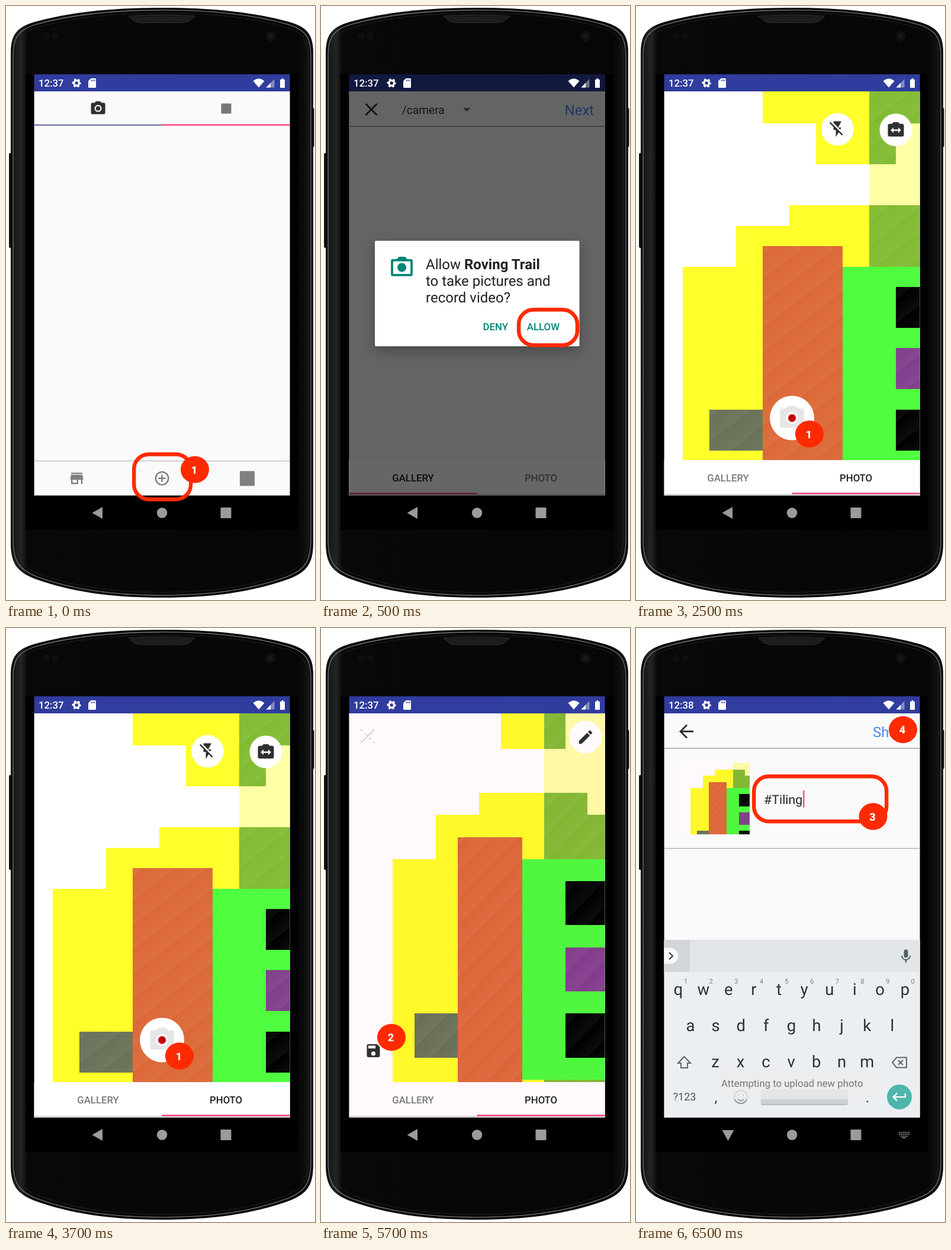
Animation of 522x1002 px, one loop 8000 ms. Source, as an HTML page:

```html
<!DOCTYPE html>
<html lang="en">
<head>
<meta charset="utf-8">
<title>Photo sharing walkthrough</title>
<style>
html, body { margin: 0; width: 100%; height: 100%; overflow: hidden; background: #fff; }
svg { display: block; width: 522px; height: 1002px; font-family: Roboto, "Noto Sans", sans-serif; text-rendering: geometricPrecision; }
.scene { opacity: 0; }
.badge { font-weight: 900; font-stretch: 75%; }
</style>
</head>
<body>
<svg id="stage" viewBox="0 0 522 1002" xmlns="http://www.w3.org/2000/svg"></svg>
<script>
const LOOP = 8000;
const LEFT = 47.6, WIDTH = 432, HALF = WIDTH / 2;
const RED = '#ff2a00', PINK = '#ff4081', TEAL = '#008577', INK = '#303030';

const box = (x, y, w, h, fill, more = '') =>
  `<rect x="${x}" y="${y}" width="${w}" height="${h}" fill="${fill}" ${more}/>`;
const wide = (y, h, fill, more) => box(LEFT, y, WIDTH, h, fill, more);
const disc = (x, y, r, fill, more = '') =>
  `<circle cx="${x}" cy="${y}" r="${r}" fill="${fill}" ${more}/>`;
const line = (d, color, width, more = '') =>
  `<path d="${d}" fill="none" stroke="${color}" stroke-width="${width}" ${more}/>`;
const shape = (d, fill, more = '') => `<path d="${d}" fill="${fill}" ${more}/>`;
const text = (x, y, size, fill, str, more = '') =>
  `<text x="${x}" y="${y}" font-size="${size}" fill="${fill}" ${more}>${str}</text>`;
const mid = (x, y, size, fill, str, more = '') =>
  text(x, y, size, fill, str, 'text-anchor="middle" ' + more);

// Icons live on a 24 unit grid.
const ICONS = {
  camera: 'M9 2 7.17 4H4c-1.1 0-2 .9-2 2v12c0 1.1.9 2 2 2h16c1.1 0 2-.9 2-2V6c0-1.1-.9-2-2-2h-3.17L15 2zm3 15a5 5 0 1 1 0-10 5 5 0 0 1 0 10z',
  store: 'M20 4H4v2h16zm1 10v-2l-1-5H4l-1 5v2h1v6h10v-6h4v6h2v-6zm-9 4H6v-4h6z',
  flash: 'M3.27 3 2 4.27l5 5V13h3v9l3.58-6.14L17.73 20 19 18.73zM17 10h-4l4-8H7v2.18l8.46 8.46z',
  flip: 'M20 4h-3.17L15 2H9L7.17 4H4c-1.1 0-2 .9-2 2v12c0 1.1.9 2 2 2h16c1.1 0 2-.9 2-2V6c0-1.1-.9-2-2-2zm-5 11.5V13H9v2.5L5.5 12 9 8.5V11h6V8.5l3.5 3.5z',
  pencil: 'M3 17.25V21h3.75L17.81 9.94l-3.75-3.75zM20.71 7.04c.39-.39.39-1.02 0-1.41l-2.34-2.34c-.39-.39-1.02-.39-1.41 0l-1.83 1.83 3.75 3.75z',
  save: 'M17 3H5c-1.11 0-2 .9-2 2v14c0 1.1.89 2 2 2h14c1.1 0 2-.9 2-2V7zm-5 16a3 3 0 1 1 0-6 3 3 0 0 1 0 6zm3-10H5V5h10z',
  back: 'M20 11H7.83l5.59-5.59L12 4l-8 8 8 8 1.41-1.41L7.83 13H20z',
  mic: 'M12 14a3 3 0 0 0 3-3V5a3 3 0 0 0-6 0v6a3 3 0 0 0 3 3zm5.3-3c0 3-2.54 5.1-5.3 5.1S6.7 14 6.7 11H5c0 3.41 2.72 6.23 6 6.72V21h2v-3.28c3.28-.48 6-3.3 6-6.72z',
  enter: 'M19 7v4H5.83l3.58-3.59L8 6l-6 6 6 6 1.41-1.41L5.83 13H21V7z'
};
const icon = (name, x, y, scale, fill) =>
  shape(ICONS[name], fill, `transform="translate(${x} ${y}) scale(${scale})"`);

const ring = (x, y, w, h) =>
  box(x, y, w, h, 'none', `rx="25" stroke="${RED}" stroke-width="6.4"`);
const badge = (x, y, n) =>
  `<ellipse cx="${x}" cy="${y}" rx="24" ry="22.8" fill="${RED}"/>` +
  mid(x - 1, y + 6.5, 18, '#fff', n, 'class="badge"');

// Block picture: colour, sheen flag and cells as left, top, right, bottom.
const BLOCKS = [
  ['#ffff2b', 0, [3,-10,7,-7], [5,-7,7,-5], [4,-3,7,-2], [2,-2,7,0], [0,0,7,14]],
  ['#82bb32', 1, [7,-10,12,-7], [7,-7,8,-5], [7,-3,9,-2], [7,-2,12,0], [7,10,12,14]],
  ['#ffffa6', 0, [8,-7,12,-5], [7,-5,12,-3], [9,-3,12,-2]],
  ['#4fff3f', 0, [6,0,12,10]],
  ['#dc6837', 1, [3,-1,6,14]],
  ['#000', 1, [8,1,12,3], [8,7,12,9]],
  ['#813e8c', 1, [8,4,12,6]],
  ['#697258', 1, [1,7,3,9]]
];
const picture = (x, y, sx, sy, clip) => {
  const cells = BLOCKS.map(([fill, sheen, ...list]) => list.map(([l, t, r, b]) => {
    const cell = f => box(l, t, r - l, b - t, f);
    return cell(fill) + (sheen ? cell('url(#sheen)') : '');
  }).join('')).join('');
  return `<g clip-path="url(#${clip})" shape-rendering="crispEdges">` +
    `<g transform="translate(${x} ${y}) scale(${sx} ${sy})">${cells}</g></g>`;
};
const tint = (x, y, w, h) => box(x, y, w, h, '#fff8fd', 'style="mix-blend-mode:multiply"');

const page = fill => wide(144, 681.7, fill);
const bar = wide(115.2, 28.8, '#303c9e');
const status = time =>
  text(55, 136, 16.8, '#fff', time, 'font-weight="500"') +
  `<circle cx="119.2" cy="130" r="4.4" fill="none" stroke="#fff" stroke-width="3.4"/>` +
  `<circle cx="119.2" cy="130" r="6.4" fill="none" stroke="#fff" stroke-width="2.6" stroke-dasharray="3.4 3.3" stroke-dashoffset="1.7"/>` +
  shape('M143.5 122H150.5a1.5 1.5 0 0 1 1.5 1.5v13a1.5 1.5 0 0 1-1.5 1.5h-10a1.5 1.5 0 0 1-1.5-1.5V126.5z', '#fff') +
  line('M144.5 124v3m2.6-3v3m2.6-3v3', '#303c9e', 1.2) +
  shape('M417.5 126.5q9.5-8 19 0L427 137.5z', '#fff') +
  shape('M453.5 123v14.5h-14z', '#fff', 'opacity=".4"') +
  shape('M447 129.7v7.8h-7.5z', '#fff') +
  shape('M463 124h2.5v-2h3v2h2.5v14h-8z', '#fff');

const dots = [0, 1, 2].map(r => [0, 1, 2, 3, 4, 5].map(c =>
  r === 2 && (c < 1 || c > 4) ? '' : box(444 + c * 3.2, 850 + r * 3.2, 1.9, 1.9, '#999')
).join('')).join('');
const nav = keyboard =>
  shape(keyboard ? 'M145.5 847h20l-10 18z' : 'M145.5 855l17.5-10v20z', '#9b9b9b') +
  disc(263.6, 855, 8.7, '#9b9b9b') + box(362.5, 846, 18, 18, '#9b9b9b', 'rx="1"') +
  (keyboard ? dots + box(449.5, 859, 6, 1.5, '#999') : '');

const tabs = (active, bg) => {
  const label = (x, str, on) =>
    mid(x, 801.5, 16.8, on ? '#212121' : '#7b7b7b', str, 'font-weight="500"');
  return wide(766, 59.7, bg) + wide(823.4, 2.3, '#c9c9c9') +
    box(active ? LEFT + HALF : LEFT, 821, HALF, 2.4, PINK) +
    label(155.5, 'GALLERY', !active) + label(371.6, 'PHOTO', active);
};

const body = 'M8 80C8 48 18 36 48 27 110 10 180 3 263.5 3S417 10 479 27C509 36 519 48 519 80V905C519 940 509 954 479 966 415 989 347 998 263.5 998S112 989 48 966C18 954 8 940 8 905Z';
const rim = (sx, sy, color, width) => line(body, color, width,
  `transform="translate(263.5 500.5) scale(${sx} ${sy}) translate(-263.5 -500.5)"`);
const stop = (at, color, alpha = 1) =>
  `<stop offset="${at}" stop-color="${color}" stop-opacity="${alpha}"/>`;
const defs = `<defs>
  <linearGradient id="shell">${stop(0, '#050505') + stop(.01, '#161616') +
    stop(.035, '#242424') + stop(.055, '#080808') + stop(.95, '#060606') +
    stop(.985, '#121212') + stop(1, '#050505')}</linearGradient>
  <linearGradient id="sheen" gradientUnits="userSpaceOnUse" x2=".6" y2=".6" spreadMethod="repeat">
    ${stop(0, '#fff', 0) + stop(1, '#fff', .05)}</linearGradient>
  <clipPath id="view">${wide(144, 622, '#000')}</clipPath>
  <clipPath id="thumb"><rect x="72" y="228" width="120" height="120"/></clipPath>
  <clipPath id="screen">${wide(115, 711, '#000')}</clipPath>
  <filter id="lift" x="-20%" y="-20%" width="140%" height="150%">
    <feDropShadow dx="0" dy="8" stdDeviation="11" flood-opacity=".28"/></filter>
</defs>`;

const phone = box(5, 248, 5, 160, '#111', 'rx="2"') + box(516, 172, 4.5, 66, '#111', 'rx="2"') +
  shape(body, 'url(#shell)') + rim(.984, .992, '#747474', 1.3) + rim(.966, .982, '#222', 1) +
  shape('M207 17Q263 13 319 17L310 25Q304 28 298 28H228Q222 28 216 25Z', '#181818', 'stroke="#343434"') +
  line('M214 20.5H312M220 24H306', '#303030', 1.4, 'stroke-dasharray="2 2"') +
  disc(447, 51, 9, '#101010') + disc(447, 51, 4, '#191919') +
  disc(68, 51, 6, '#0e0e0e') + disc(83, 51, 6, '#0e0e0e') +
  box(33, 115, 460, 768, '#000');

const home = page('#fafafa') + bar + status('12:37') +
  icon('camera', 141.2, 158.4, 1.2, INK) + disc(155.6, 172.8, 3.8, INK) +
  box(363.5, 164.5, 17, 17, '#777') +
  box(LEFT, 199.6, HALF, 2.4, '#7378ad') + box(LEFT + HALF, 199.4, HALF, 2.4, PINK) +
  wide(766.8, 1.3, '#bdbdbd') +
  icon('store', 105.2, 782.4, 1.2, '#808080') +
  disc(263.6, 796.8, 10.8, 'none', 'stroke="#808080" stroke-width="2.4"') +
  line('M257.6 796.8h12m-6-6v12', '#808080', 2.4) +
  box(395, 784.5, 25, 25, '#808080') +
  nav() + ring(216.2, 756.2, 96, 76) + badge(319, 782, 1);

const permission = page('#fcfcfc') + bar +
  line('M75.5 165l19 19m0-19l-19 19', '#2a2a2a', 2.8) +
  text(136.8, 181.5, 19.2, '#303030', '/camera') + shape('M240 172h12l-6 6z', '#666') +
  text(411.6, 183.5, 24, '#4a8af4', 'Next') + wide(202, 2, '#ababab') +
  tabs(false, '#fff') + wide(115, 711, '#000', 'opacity=".6"') + status('12:37') +
  `<g clip-path="url(#screen)">${box(91, 396, 345.5, 178, '#fff', 'rx="2" filter="url(#lift)"')}</g>` +
  box(120, 428.8, 33, 25, 'none', `rx="1" stroke="${TEAL}" stroke-width="3.8"`) +
  shape('M127 428l4.5-5h10.5l4.5 5z', TEAL) + disc(136.5, 441, 7.5, TEAL) +
  text(177, 444, 24, '#212121', 'Allow <tspan font-weight="700">Roving Trail</tspan>') +
  text(177, 472, 24, '#212121', 'to take pictures and') +
  text(177, 500, 24, '#212121', 'record video?') +
  text(273.6, 547, 16.8, TEAL, 'DENY', 'font-weight="500"') +
  text(347.8, 547, 16.8, TEAL, 'ALLOW', 'font-weight="500"') +
  nav() + ring(334, 512.2, 99, 60);

const capture = page('#fff') + picture(78.5, 439.5, 45.1, 34.45, 'view') + bar + status('12:37') +
  disc(340.5, 208, 27.5, '#fff') + icon('flash', 324.3, 191.8, 1.33, INK) +
  disc(439, 209, 27.5, '#fff') + icon('flip', 422.8, 193.3, 1.35, INK) +
  disc(263.6, 695, 37.5, '#fff') + icon('camera', 239.1, 670.5, 2.04, '#e6e6e6') +
  disc(263.6, 695, 6.6, '#c80000') +
  tabs(true, '#fff') + nav() + badge(293, 722, 1);

const review = page('#fff') + picture(121, 389.7, 36.5, 37.2, 'view') + wide(144, 622, '#fff8fd', 'style="mix-blend-mode:multiply"') +
  bar + status('12:37') +
  line('M90 171l-23 23', '#999', 1) +
  line('M67 171l23 23', '#999', 1, 'stroke-dasharray="4 6"') +
  disc(447, 184, 27.5, '#fffafd') + icon('pencil', 432, 169, 1.25, INK) +
  icon('save', 73.8, 698.3, 1.22, INK) +
  tabs(true, '#fff8fd') + nav() + badge(119, 690.5, 2);

const row = (letters, x, y, step) => [...letters].map((c, i) =>
  mid(x + i * step, y, 27.5, '#263238', c)).join('');
const keyboard = wide(526, 299.7, '#eceff1') + wide(526, 54, '#e3e6e8') +
  box(LEFT, 526, 43.4, 54, '#d3d6d8') +
  shape('M47.6 539.5h10a13.5 13.5 0 0 1 0 27h-10z', '#f7f8f8') +
  line('M56 547.5l6 5.7-6 5.7', '#37474f', 2.2) +
  icon('mic', 442.2, 540, 1.15, '#546068') +
  row('qwertyuiop', 71.2, 619, 42.6) + row('asdfghjkl', 92, 680, 42.6) + row('zxcvbnm', 134, 741, 42.7) +
  [...'1234567890'].map((n, i) => mid(84 + i * 42.65, 600, 11.5, '#78838a', n)).join('') +
  line('M81.5 723l10.5 11h-5v8h-11v-8h-5z', '#5d686e', 2) +
  line('M440 724.5h17v17h-17l-7-8.5z', '#5d686e', 2) +
  line('M443 729l8 8m0-8l-8 8', '#5d686e', 2) +
  mid(82, 797, 18, '#4b565c', '?123') + mid(135, 800, 25, '#37474f', ',') + mid(391, 800, 25, '#37474f', '.') +
  disc(177, 791, 11, 'none', 'stroke="#90989c" stroke-width="2"') +
  disc(173, 788, 1.7, '#90989c') + disc(181, 788, 1.7, '#90989c') +
  line('M171 793.5q6 8 12 0', '#90989c', 2) +
  box(211, 779, 147, 26, '#b7bcbf', 'rx="3"') + box(211, 778, 147, 25, '#ccd0d2', 'rx="3"') +
  disc(445, 791, 21, '#4db6ac') + icon('enter', 430.5, 776.5, 1.22, '#fff') +
  box(119, 741, 291, 54, '#eee', 'rx="27" opacity=".72"') +
  text(144, 774, 16.8, '#747779', 'Attempting to upload new photo');

const share = page('#fafafa') + bar + status('12:38') +
  icon('back', 67, 156.5, 1.5, '#333') + text(400, 183.5, 24, '#4a8af4', 'Share') +
  wide(202, 1.8, '#b0b0b0') + wide(371, 1.5, '#b5b5b5') +
  box(72, 228, 120, 120, '#fff') + picture(92.4, 270, 10.16, 10.34, 'thumb') + tint(72, 228, 120, 120) +
  text(216, 297, 21.4, '#262626', '#Tiling') + box(282.2, 274, 2.3, 28.5, PINK) +
  keyboard + nav(true) + ring(199.2, 250.2, 224, 76) + badge(400.5, 318, 3) + badge(451, 171.5, 4);

const SCENES = [[0, home], [500, permission], [2500, capture], [4500, review], [6500, share]];
const stage = document.getElementById('stage');
stage.innerHTML = defs + phone + SCENES.map(([, art]) => `<g class="scene">${art}</g>`).join('');

stage.querySelectorAll('.scene').forEach((scene, i) => {
  const from = SCENES[i][0] / LOOP;
  const to = i + 1 < SCENES.length ? SCENES[i + 1][0] / LOOP : 1;
  const steps = [[from, 1], [to, to < 1 ? 0 : 1]];
  if (from > 0) steps.unshift([0, 0]);
  if (to < 1) steps.push([1, 0]);
  scene.animate(
    steps.map(([offset, opacity]) => ({ offset, opacity, easing: 'step-end' })),
    { duration: LOOP, iterations: Infinity });
});
</script>
</body>
</html>
```
